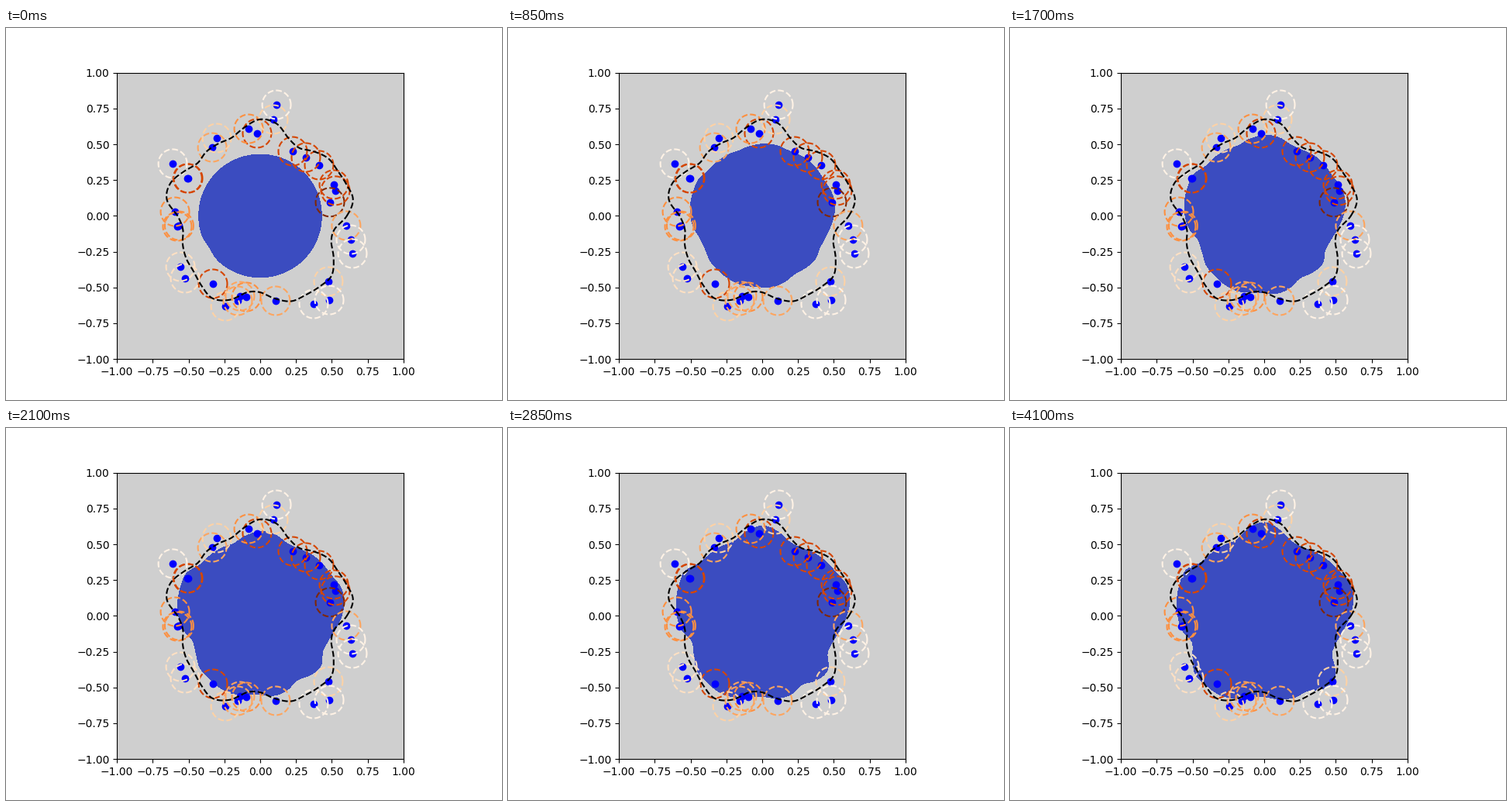
A matplotlib script that plays this animation: 640 by 480 pixels, repeating every 4150 ms.

```python
import numpy as np
import matplotlib.pyplot as plt
from matplotlib.animation import FuncAnimation

FRAMES, STEP, GROW_MS = 83, 50, 3700
THETA = np.linspace(0, 2 * np.pi, 721)

# Radii in thousandths every 10 degrees
CURVE = [605, 658, 641, 626, 622, 586, 547, 577, 654, 674, 628, 581,
         583, 585, 572, 617, 667, 662, 577, 548, 576, 596, 606, 637,
         665, 624, 543, 534, 586, 634, 637, 645, 650, 592, 528, 528]
REGION = [597, 630, 640, 610, 590, 570, 548, 553, 610, 652, 617, 563,
          566, 570, 578, 632, 628, 618, 602, 580, 535, 575, 628, 630,
          632, 612, 575, 565, 590, 606, 605, 657, 645, 545, 535, 560]

# Growth rate every 30 degrees
RATE = [2.1, 1.8, 3.1, 1.5, 2.2, 1.95, 2, 1.2, 1.5, 2.6, .85, 1.2]

# Sample positions grouped by shade
POINTS = {
    1.0: [(.487, .095)],
    .76: [(.227, .451), (.319, .408), (.411, .354), (.514, .219),
          (.525, .176), (-.022, .576), (-.330, -.474), (-.503, .262),
          (-.507, .262)],
    .49: [(-.081, .608), (-.595, .029), (-.579, -.074), (-.566, -.069),
          (-.097, -.566)],
    .41: [(-.335, .478), (-.157, -.593), (-.141, -.561), (.108, -.593),
          (.600, -.068)],
    .24: [(-.303, .543), (.092, .673), (-.243, -.631), (.476, -.458)],
    .16: [(-.557, -.355), (-.525, -.436)],
    .03: [(.114, .776), (-.611, .365), (.373, -.615), (.482, -.588),
          (.633, -.166), (.644, -.263)],
}


def smooth(row):
    """Periodic Catmull-Rom interpolation of evenly spaced values."""
    v = np.array(row, float)
    n = len(v)
    pos = THETA / (2 * np.pi) * n
    i = pos.astype(int)
    u = pos - i
    a, b, c, d = (v[(i + k) % n] for k in (-1, 0, 1, 2))
    return b + u / 2 * (c - a + u * (2 * a - 5 * b + 4 * c - d
                                     + u * (3 * (b - c) + d - a)))


def polar(r):
    return r * np.cos(THETA), r * np.sin(THETA)


start = .429 - .012 * np.exp(-((THETA - np.radians(212)) / .16) ** 2)
final = smooth(REGION) / 1000
rate = smooth(RATE)


def radius(t):
    left = 1 - min(t / GROW_MS, 1)
    return final + (start - final) * left ** rate


fig, ax = plt.subplots(figsize=(6.4, 4.8), dpi=100)
ax.set(xlim=(-1, 1), ylim=(-1, 1), aspect="equal", facecolor="#cfcfcf")

region, = ax.fill(*polar(start), color="#3b4cc0", lw=0,
                  antialiased=False, zorder=1)
ring_x, ring_y = polar(.1)
for shade, group in POINTS.items():
    for x, y in group:
        ax.plot(x, y, "o", color="blue", ms=6, zorder=2)
        ax.plot(x + ring_x, y + ring_y, "--", lw=1.5, zorder=3,
                color=plt.cm.Oranges(shade))
ax.plot(*polar(smooth(CURVE) / 1000), "k--", lw=1.5, zorder=4)


def update(i):
    region.set_xy(np.column_stack(polar(radius(i * STEP))))
    return region,


anim = FuncAnimation(fig, update, frames=FRAMES, interval=STEP,
                     repeat=True, repeat_delay=0)
plt.show()
```
